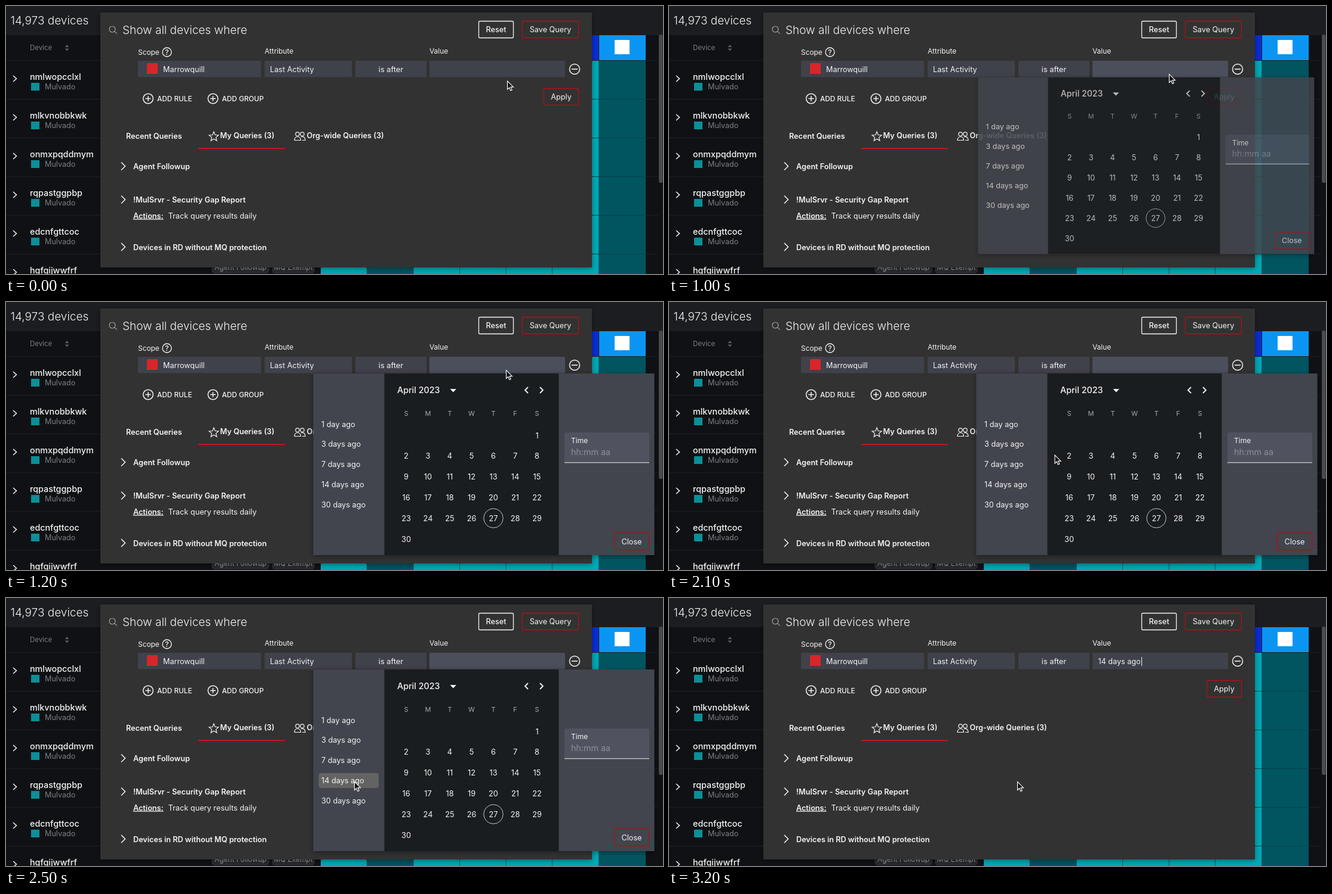
Write an HTML page that moves like this. It is 1100 px wide and 450 px high and loops after 5200 ms.

```html
<!DOCTYPE html>
<html lang="en">
<head>
<meta charset="utf-8">
<title>Device query</title>
<style>
  html, body { margin: 0; width: 100%; height: 100%; overflow: hidden; background: #0f1114; }
  svg { display: block; width: 100vw; height: 100vh; font-family: Inter, Roboto, sans-serif; }
  text { white-space: pre; }
</style>
</head>
<body>
<svg id="stage" viewBox="0 0 1100 450"></svg>
<script>
const LOOP = 5200;
const ORIGIN = { x: 715, y: 115 };
const COLOR = {
  page: '#0f1114', bar: '#1c1d21', line: '#1f2125', modal: '#333333', field: '#3f414b',
  fieldHover: '#4b4f5c', panel: '#42454d', calendar: '#1a1d20', red: '#b10f1a',
  teal: '#00a9b5', darkTeal: '#005560', white: '#f4f4f4', muted: '#7d7f83'
};

const range = n => [...Array(n).keys()];
const each = (n, fn) => range(n).map(fn).join('');

const rect = (x, y, w, h, fill, extra = '') =>
  `<rect x="${x}" y="${y}" width="${w}" height="${h}" fill="${fill}" ${extra}/>`;
const path = (d, stroke = COLOR.white, width = 1.4, extra = 'fill="none"') =>
  `<path d="${d}" stroke="${stroke}" stroke-width="${width}" ${extra}/>`;
const ring = (x, y, r, stroke = COLOR.white, width = 1.5) =>
  `<circle cx="${x}" cy="${y}" r="${r}" fill="none" stroke="${stroke}" stroke-width="${width}"/>`;
const text = (x, y, size, str, { fill = COLOR.white, weight = 400, anchor = 'start', extra = '' } = {}) =>
  `<text x="${x}" y="${y}" font-size="${size}" font-weight="${weight}" fill="${fill}" text-anchor="${anchor}" ${extra}>${str}</text>`;
const bold = (x, y, str, extra = '') => text(x, y, 12.65, str, { weight: 600, extra });
const chevron = (x, y, w, h, width = 1.5) => path(`M${x} ${y - h}l${w} ${h}l${-w} ${h}`, COLOR.white, width);

function button(x, y, w, label, stroke, weight = 400) {
  return rect(x + .5, y + .5, w - 1, 28, 'none', `rx="2" stroke="${stroke}" stroke-width="1.3"`) +
    text(x + w / 2, y + 19, 12.7, label, { weight, anchor: 'middle' });
}

function table() {
  const names = ['nmlwopcclxl', 'mlkvnobbkwk', 'onmxpqddmym', 'rqpastggpbp', 'edcnfgttcoc', 'hgfgijwwfrf'];
  const rows = names.map((name, i) => {
    const y = 91 + 65 * i;
    return rect(0, y, 1091, 1, COLOR.line) +
      chevron(12, y + 31, 5.5, 5) +
      text(40, y + 33, 14.3, name, { weight: 500 }) +
      rect(42, y + 38, 14, 13, '#0b8f98') +
      text(65, y + 49, 12.6, 'Mulvado', { fill: COLOR.muted });
  }).join('');
  const chip = (x, w, label) => rect(x, 425, w, 24, '#292b30', 'rx="5"') +
    text(x + w / 2, 442.5, 11.9, label, { fill: '#a4a6aa', anchor: 'middle' });
  const cells = each(6, i => rect(527 + 77.6 * i, 416, 77, 34, i === 1 ? COLOR.darkTeal : COLOR.teal));

  return rect(0, 0, 1100, 450, COLOR.page) +
    rect(0, 0, 1100, 49, COLOR.bar) +
    text(7.5, 31, 19, '14,973 devices', { weight: 300 }) +
    text(40, 74, 11.5, 'Device', { fill: '#7b7d81' }) +
    '<path d="M98.5 69l3.5-4l3.5 4zM98.5 71.5l3.5 4l3.5-4z" fill="#5b5d62"/>' +
    rows + chip(344, 97, 'Agent Followup') + chip(445, 72, 'MQ Exempt') + cells +
    rect(975, 49, 17, 42, '#0a2cd3') + rect(975, 92, 17.5, 358, COLOR.teal) +
    rect(993, 49, 78, 42, '#0a95f2') + rect(1019, 57, 25, 24, '#ffffff') +
    rect(993, 92, 78, 358, COLOR.darkTeal) +
    each(5, i => rect(975, 156 + 65 * i, 96, 1, '#00424c')) +
    rect(1093, 48, 6.5, 249, '#4a4b4e', 'rx="3"');
}

function modal() {
  const field = (x, w, id = '') => rect(x, 92, w, 27.5, COLOR.field, `rx="1" ${id}`);
  const plus = x => ring(x, 155.5, 8.3) + path(`M${x - 4.5} 155.5h9M${x} 151v9`, COLOR.white, 1.5);
  const starPoints = range(10).map(i => {
    const r = i % 2 ? 3.7 : 8.4, a = Math.PI * (i / 5 - .5);
    return `${(348 + r * Math.cos(a)).toFixed(1)},${(219.5 + r * Math.sin(a)).toFixed(1)}`;
  }).join(' ');
  const people = ring(488, 215, 3.2, COLOR.white, 1.2) + ring(496, 215, 3.2, COLOR.white, 1.2) +
    path('M483 225.5q0-6 5.5-6q4.5 0 5 6zM494 219.6q7-1 7 5.9h-5', COLOR.white, 1.2);

  return rect(158, 11, 823, 428, COLOR.modal, 'filter="url(#shadow)"') +
    ring(178, 39, 5, '#a0a0a0', 1.2) + path('M181.7 42.7l4 4', '#a0a0a0', 1.2) +
    text(195, 46.5, 19, 'Show all devices where', { weight: 300 }) +
    button(791, 25, 59, 'Reset', COLOR.white, 500) +
    button(864, 25, 95, 'Save Query', COLOR.red) +
    text(221, 82, 11.9, 'Scope') + text(433, 80, 11.9, 'Attribute') + text(709, 80, 11.9, 'Value') +
    ring(269.5, 77.5, 7.5, COLOR.white, 1.3) +
    text(269.5, 82, 12, '?', { anchor: 'middle', weight: 500 }) +
    field(221, 206) + field(433, 146) + field(585, 119) + field(709, 227, 'id="value"') +
    rect(236, 96, 18, 18, '#d9252c') +
    text(263, 110.5, 12.6, 'Marrowquill') + text(442, 110.5, 12.7, 'Last Activity') +
    text(644.5, 110.5, 12.8, 'is after', { anchor: 'middle' }) +
    `<g id="entry">${text(718.5, 111, 12.6, '14 days ago')}${rect(791, 99, 1, 15, COLOR.white)}</g>` +
    ring(952, 106, 8.5) + path('M947 106h10', COLOR.white, 1.6) +
    plus(238) + text(253, 160, 11.75, 'ADD RULE', { weight: 500 }) +
    plus(346.5) + text(361.5, 160, 11.75, 'ADD GROUP', { weight: 500 }) +
    button(900, 138, 59, 'Apply', COLOR.red) +
    bold(201, 223, 'Recent Queries') +
    `<polygon points="${starPoints}" fill="none" stroke="${COLOR.white}" stroke-width="1.2"/>` +
    bold(358.5, 221.5, 'My Queries (3)') + people + bold(503.5, 221.5, 'Org-wide Queries (3)') +
    rect(322, 238.2, 145, 2, '#d3111b') +
    chevron(193, 269, 6.5, 6.5) + bold(213, 273.5, 'Agent Followup') +
    chevron(193, 325, 6.5, 6.5) + bold(213, 329.5, '!MulSrvr - Security Gap Report') +
    bold(213, 356.5, 'Actions:', 'text-decoration="underline"') +
    text(271.5, 356.5, 12.75, 'Track query results daily') +
    chevron(193, 404.5, 6.5, 6.5) + bold(213, 409.5, 'Devices in RD without MQ protection');
}

function picker() {
  const colX = i => 670 + 36.5 * i;
  const presets = [1, 3, 7, 14, 30].map((n, i) =>
    text(528, 209.5 + 33.9 * i, 12.7, `${n} day${n > 1 ? 's' : ''} ago`)).join('');
  const weekdays = [...'SMTWTFS'].map((d, i) =>
    text(colX(i), 191, 11, d, { fill: '#a8abae', anchor: 'middle' })).join('');
  // The month starts on a Saturday.
  const days = each(30, i => {
    const slot = i + 6;
    return text(colX(slot % 7), 228.5 + 34.8 * Math.floor(slot / 7), 12.8, i + 1, { anchor: 'middle' });
  });
  const panels = rect(514.5, 120, 571, 305, COLOR.panel, 'filter="url(#shadow)"') +
    rect(633.5, 120, 292, 305, COLOR.calendar);
  const content = rect(523.5, 294, 100.5, 25, '#636363', 'rx="4" id="presetHover"') + presets +
    text(655, 153, 14.3, 'April 2023', { weight: 500 }) +
    `<path d="M743.5 146h10.5l-5.25 5.5z" fill="${COLOR.white}"/>` +
    path('M874 143l-5 5l5 5', COLOR.white, 1.8) + path('M894 143l5 5l-5 5', COLOR.white, 1.8) +
    weekdays + days + ring(816, 363, 16.2, '#c4c6c8', 1) +
    '<path d="M935 270v-47q0-4 4-4h134q4 0 4 4v47z" fill="#50535f"/>' +
    rect(935, 269, 142, 1.3, '#c9cacd') +
    text(946, 237, 12, 'Time') + text(946, 257, 14.3, 'hh:mm aa', { fill: '#8d9097' }) +
    button(1018, 387.5, 59, 'Close', COLOR.red);

  return `${panels}<g id="content">${content}</g>`;
}

const stage = document.getElementById('stage');
stage.innerHTML = `
  <defs><filter id="shadow" x="-10%" y="-10%" width="120%" height="125%">
    <feDropShadow dx="0" dy="2" stdDeviation="4" flood-color="#000" flood-opacity=".4"/>
  </filter></defs>
  ${table()}${modal()}<g id="picker">${picker()}</g>
  <g id="cursor">${path('M0 0v14l3.2-3l2.2 5l2.3-1l-2.2-4.9h4.5z', '#ffffff', 1.1, 'fill="#111"')}</g>`;

const el = Object.fromEntries(['value', 'entry', 'picker', 'content', 'presetHover', 'cursor']
  .map(id => [id, document.getElementById(id)]));

const poses = [
  { at: 0, x: 839.5, y: 126 },
  { at: 500, x: 837.5, y: 114.5, focus: true },
  { at: 1000, x: 837.5, y: 114.5, focus: true, alpha: .85, scale: .986 },
  { at: 1200, x: 837.5, y: 114.5, focus: true, alpha: 1 },
  { at: 1700, x: 771.5, y: 151.5, focus: true, alpha: 1 },
  { at: 1900, x: 706, y: 206, focus: true, alpha: 1 },
  { at: 2100, x: 646, y: 257, focus: true, alpha: 1 },
  { at: 2300, x: 599, y: 296, focus: true, alpha: 1, hover: true },
  { at: 2500, x: 583.5, y: 308.5, focus: true, alpha: 1, hover: true },
  { at: 3000, x: 583.5, y: 308.5, alpha: .8, hover: true, entered: true },
  { at: 3200, x: 583.5, y: 308.5, entered: true }
];

const show = (node, visible) => node.setAttribute('visibility', visible ? 'inherit' : 'hidden');

function update(time) {
  const pose = poses.findLast(p => p.at <= time);
  const { x, y, alpha = 0, scale = 1, focus, hover, entered } = pose;
  el.cursor.setAttribute('transform', `translate(${x} ${y})`);
  el.value.setAttribute('fill', focus ? COLOR.fieldHover : COLOR.field);
  show(el.entry, entered);
  show(el.picker, alpha > 0);
  show(el.presetHover, hover);
  el.picker.setAttribute('opacity', alpha);
  el.content.setAttribute('opacity', alpha);
  el.picker.setAttribute('transform',
    `translate(${ORIGIN.x} ${ORIGIN.y}) scale(${scale} ${scale * scale}) translate(${-ORIGIN.x} ${-ORIGIN.y})`);
}

const start = performance.now();
function frame() {
  update((performance.now() - start) % LOOP);
  requestAnimationFrame(frame);
}
frame();
</script>
</body>
</html>
```
